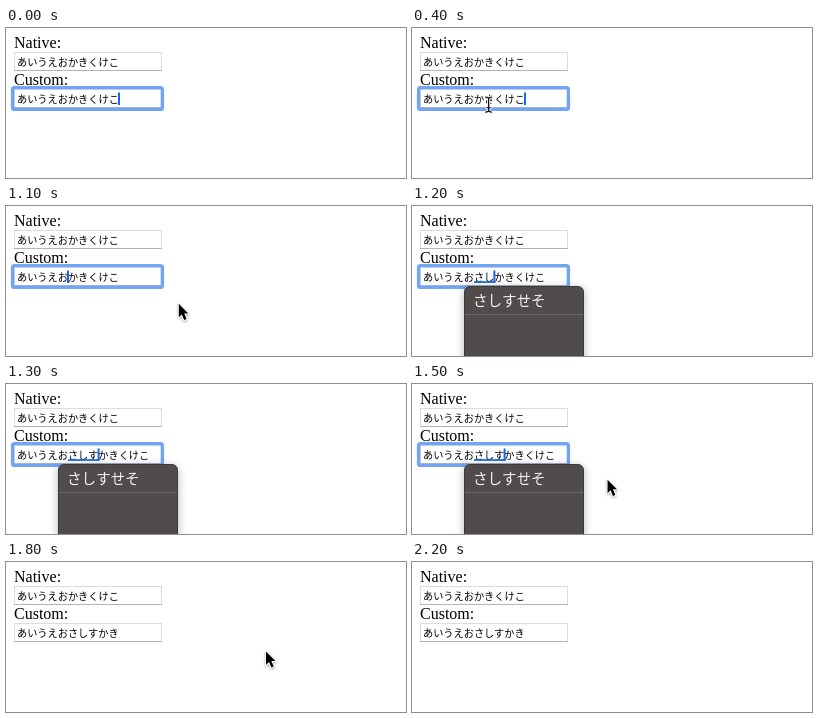
An HTML page for the animation above (2.4 s loop, 400 by 150 pixels).

```html
<!DOCTYPE html>
<html lang="ja">
<head>
<meta charset="utf-8">
<title>Text input comparison</title>
<style>
html, body { margin: 0; width: 100%; height: 100%; overflow: hidden; background: #fff; }
svg { display: block; width: 400px; height: 150px; }
.label { font: 16px "Liberation Serif", Times, serif; }
.kana { font: 10.2px "Noto Sans CJK JP", "Noto Sans CJK", sans-serif; }
.choice { font: 14.6px "Noto Sans CJK JP", "Noto Sans CJK", sans-serif; fill: #f4f2f2; }
.pointer { stroke: #fff; stroke-width: 2; paint-order: stroke; stroke-linejoin: round; filter: drop-shadow(0 1px 1px rgba(0,0,0,.35)); }
.beam { fill: none; stroke-linecap: round; }
</style>
</head>
<body>
<svg viewBox="0 0 400 150">
  <defs>
    <g id="field">
      <rect x="8.5" y="0.5" width="147" height="18" fill="#fff" stroke="#dcdcdc"/>
      <path d="M8 18.5H156" stroke="#b4b4b4"/>
    </g>
    <path id="ibeam" d="M-3 -7.5Q0 -7.5 0 -5.5Q0 -7.5 3 -7.5M0 -5.5V5.5M-3 7.5Q0 7.5 0 5.5Q0 7.5 3 7.5M-1.5 3H1.5"/>
  </defs>

  <text class="label" x="8" y="20">Native:</text>
  <use href="#field" y="24"/>
  <text class="kana" x="11" y="37.7">あいうえおかきくけこ</text>

  <text class="label" x="8" y="57">Custom:</text>
  <use href="#field" y="61"/>
  <rect id="ring" x="6.6" y="59.6" width="149.8" height="21.8" rx="2" fill="none" stroke="#72a4f5" stroke-width="3.4"/>
  <text id="value" class="kana" x="11" y="74.7"></text>
  <rect id="underline" x="62" y="75.2" height="1.7" fill="#1468dc"/>
  <rect id="caret" y="64.5" width="2" height="12.5" fill="#1467e6"/>

  <g id="popup">
    <rect x="52.5" y="80.5" width="119" height="90" rx="5.5" fill="#4f4c4b" stroke="#3c3a39" style="filter:drop-shadow(0 2px 4px rgba(0,0,0,.3))"/>
    <path d="M53 108.5H171" stroke="#6a6766"/>
    <text class="choice" x="61" y="99.6">さしすせそ</text>
  </g>

  <g id="mouse">
    <path id="arrow" class="pointer" d="M0 0V13.4L3 10.6L5.4 16.2L7.8 15.2L5.4 9.6H9.5Z"/>
    <g id="beam" class="beam">
      <use href="#ibeam" stroke="#fff" stroke-width="3"/>
      <use href="#ibeam" stroke="#111" stroke-width="1.3"/>
    </g>
  </g>
</svg>
<script>
const LOOP = 2400, STEP = 100, LEFT = 11, ADVANCE = 10.2;
const el = id => document.getElementById(id);
const show = (id, on) => el(id).setAttribute("display", on ? "inline" : "none");
const ease = p => p * p * (3 - 2 * p);

// Each trip: start, arrival, end of visibility, then both end points.
const trips = [
  { start: 100, arrive: 600, end: 900, from: [98, 85], to: [65, 72] },
  { start: 900, arrive: 1100, end: 1200, from: [65, 72], to: [172.8, 97.8] },
  { start: 1400, arrive: 1700, end: 2200, from: [173, 98], to: [260, 89.4] }
];

function mouseAt(t) {
  const trip = trips.find(m => t >= m.start && t < m.end);
  if (!trip) return null;
  const p = ease(Math.min(1, (t - trip.start) / (trip.arrive - trip.start)));
  return trip.from.map((v, i) => v + (trip.to[i] - v) * p);
}

function draw(t) {
  const focused = t < 1800;
  const typed = t < 1200 ? "" : t < 1300 ? "さし" : "さしす";
  const composing = focused && typed !== "";
  const caretIndex = t < 800 ? 10 : 5 + typed.length;

  el("value").textContent = "あいうえお" + typed + (focused ? "かきくけこ" : "かき");
  el("caret").setAttribute("x", LEFT + caretIndex * ADVANCE - 1);
  el("underline").setAttribute("width", typed.length * ADVANCE);
  show("ring", focused);
  show("caret", focused);
  show("underline", composing);
  show("popup", composing);

  const pos = mouseAt(t);
  show("mouse", pos);
  if (!pos) return;
  const [x, y] = pos;
  const overField = x > 8 && x < 156 && y > 61 && y < 80;
  el("mouse").setAttribute("transform", `translate(${x} ${y})`);
  show("beam", overField);
  show("arrow", !overField);
}

const origin = performance.now();
function tick() {
  const t = (performance.now() - origin) % LOOP;
  draw(Math.floor(t / STEP) * STEP);
  requestAnimationFrame(tick);
}
tick();
</script>
</body>
</html>
```
